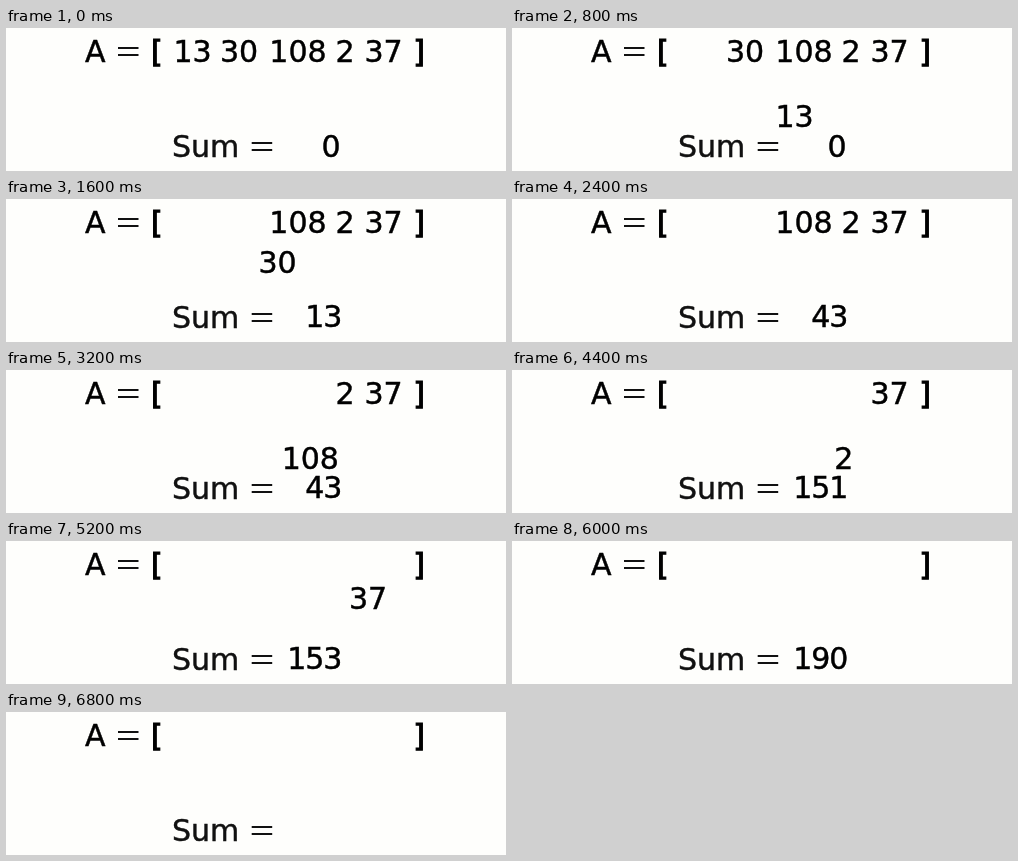
Write an HTML page that moves like this. It is 500x143 px and loops after 7200 ms.

```html
<!DOCTYPE html>
<html lang="en">
<head>
<meta charset="utf-8">
<title>Summing an array</title>
<style>
  html, body { margin: 0; width: 100%; height: 100%; overflow: hidden; background: #fefefc; }
  svg { display: block; width: 500px; height: 143px; }
  text { font: 30px "DejaVu Sans", sans-serif; white-space: pre; stroke: #000; stroke-width: .45px; }
  .soft { fill: #111; stroke: #111; }
  .bracket { stroke-width: 1.1px; }
  .total { letter-spacing: -1.1px; }
  path { stroke: #111; stroke-width: 1.8px; }
</style>
</head>
<body>
<svg id="stage" viewBox="0 0 500 143"></svg>
<script>
const STEP = 400, STEPS = 18;
const stage = document.getElementById("stage");

function add(tag, className = "") {
  const node = document.createElementNS("http://www.w3.org/2000/svg", tag);
  node.setAttribute("class", className);
  return stage.appendChild(node);
}

function label(string, x, y, className) {
  const node = add("text", className);
  node.textContent = string;
  place(node, x, y);
  return node;
}

function equals(x, y) {
  add("path").setAttribute("d", `M${x} ${y}h20.5m-20.5 7h20.5`);
}

function place(node, x, y) {
  node.setAttribute("x", x);
  node.setAttribute("y", y);
}

function show(node, visible) {
  node.setAttribute("visibility", visible ? "visible" : "hidden");
}

label("A", 79, 34);
equals(112, 20);
label("[", 145, 34, "bracket");
label("]", 407.3, 34, "bracket");
label("Sum", 166, 129, "soft");
equals(245.7, 115);

// Each number rests in the row, drops twice, then joins the sum.
const items = [
  { value: 13,  path: [[167.5, 34], [213.5, 77], [263.5, 99]] },
  { value: 30,  path: [[214, 34], [252.5, 74], [280, 99]] },
  { value: 108, path: [[263.3, 34], [272.7, 71], [275.7, 99]] },
  { value: 2,   path: [[329.5, 34], [325.5, 69], [322.3, 99]] },
  { value: 37,  path: [[358.5, 34], [343, 68], [319, 99]] },
];
for (const item of items) item.node = label(item.value, ...item.path[0]);

const total = label("0", 315.5, 129, "total");
const closing = label("FINISHED!", 206, 82);

function draw(time) {
  const step = Math.floor(time / STEP) % STEPS;
  let sum = 0;
  items.forEach((item, i) => {
    const stop = Math.max(0, step - 3 * i);
    const landed = stop > 2;
    show(item.node, !landed);
    if (landed) sum += item.value;
    else place(item.node, ...item.path[stop]);
  });

  const digits = String(sum).length;
  total.textContent = sum;
  if (sum) place(total, 317.3 - 18 * (digits - 1), 128);
  else place(total, 315.5, 129);
  show(total, step < 17);
  show(closing, step === 16);
}

const start = performance.now();
function tick() {
  draw(performance.now() - start);
  requestAnimationFrame(tick);
}
draw(0);
tick();
</script>
</body>
</html>
```
